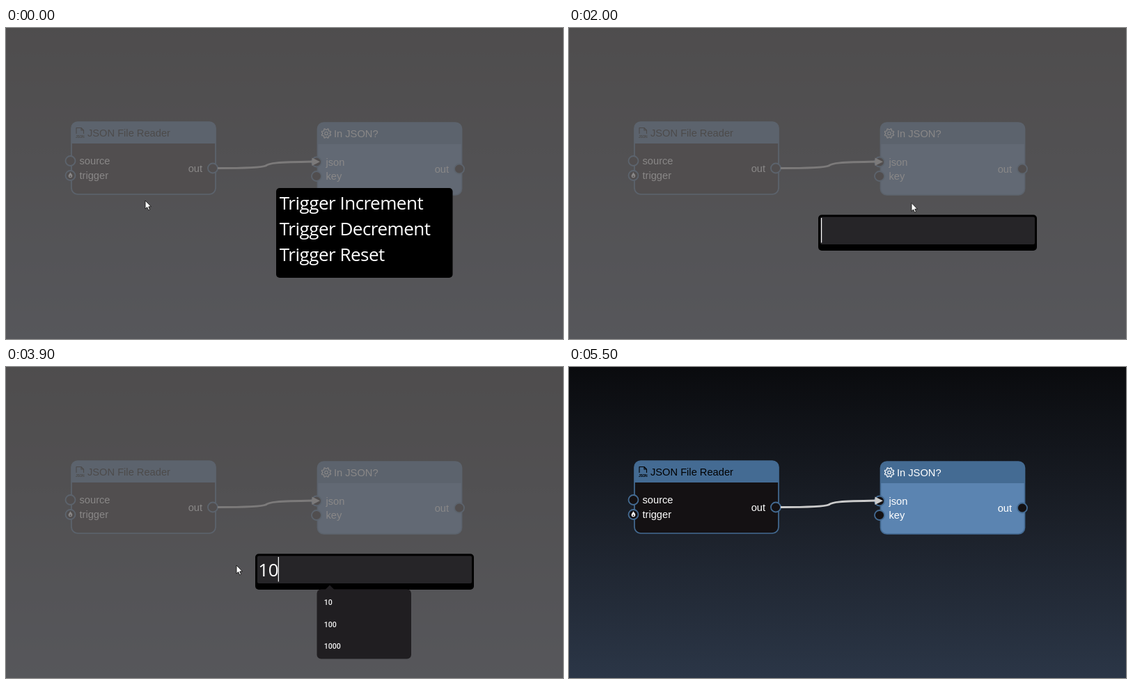
An HTML page with a canvas that plays this animation: 800 by 447 pixels, repeating every 5600 ms.

```html
<!DOCTYPE html>
<html lang="en">
<head>
<meta charset="utf-8">
<title>Node editor</title>
<style>
  html, body { margin: 0; width: 100%; height: 100%; overflow: hidden; background: #1c2029; }
  canvas { display: block; }
</style>
</head>
<body>
<canvas id="stage" width="800" height="447"></canvas>
<script>
const ctx = document.getElementById('stage').getContext('2d');
const W = 800, H = 447, LOOP = 5600, STEP = 100;
const BLUE = '#446b93', DARK = '#141113';
const NODE_FONT = '14.67px "Liberation Sans", Arial, sans-serif';
const MENU_FONT = '26px "Open Sans", "Noto Sans", sans-serif';
const LIST_FONT = '500 10.6px Roboto, sans-serif';

// Pointer stops: time, x, y
const POINTER = [
  [0, 200, 248], [100, 200, 248], [700, 521.5, 252], [1100, 521.5, 252],
  [1600, 511.5, 241], [1800, 511.5, 241], [2400, 436, 281], [3300, 436, 281],
  [3800, 331, 285], [4200, 331, 285], [4800, 715, -25]
];

const TYPED = [[1800, ''], [2400, '0'], [3100, ''], [3300, '1'], [3500, '10']];

const MENUS = [
  { from: 0, to: 1100, x: 388, y: 230, w: 253.5, h: 129, rowW: 222,
    rows: ['Trigger Increment', 'Trigger Decrement', 'Trigger Reset'] },
  { from: 1100, to: 1800, x: 418.5, y: 181, w: 192.5, h: 227, rowW: 161,
    rows: ['When Always', 'When <', 'When ≤', 'When =', 'When ≥', 'When >'] }
];

const LISTS = [
  { from: 2500, to: 3100, items: ['0.1', '0.5', '0.7', '0.9'] },
  { from: 3300, to: 4100, items: ['10', '100', '1000'] }
];
const CLOSE = 4000;

function text(str, x, y, font, color, spacing = 0) {
  ctx.font = font;
  ctx.letterSpacing = spacing + 'px';
  ctx.fillStyle = color;
  ctx.fillText(str, x, y);
}

function box(x, y, w, h, r, fill) {
  ctx.beginPath();
  ctx.roundRect(x, y, w, h, r);
  ctx.fillStyle = fill;
  ctx.fill();
}

function shape(points, fill) {
  ctx.beginPath();
  points.forEach(([x, y]) => ctx.lineTo(x, y));
  ctx.closePath();
  ctx.fillStyle = fill;
  ctx.fill();
}

function stroke(color, width) {
  ctx.strokeStyle = color;
  ctx.lineWidth = width;
  ctx.stroke();
}

function port(x, y) {
  ctx.beginPath();
  ctx.arc(x, y, 7, 0, Math.PI * 2);
  ctx.fillStyle = DARK;
  ctx.fill();
  stroke(BLUE, 1.8);
}

function node(x, y, body) {
  box(x, y, 207, 104, 9, body);
  box(x, y, 207, 31, [9, 9, 0, 0], BLUE);
  ctx.beginPath();
  ctx.roundRect(x, y, 207, 104, 9);
  stroke(BLUE, 1.7);
}

function fileIcon(x, y) {
  ctx.beginPath();
  ctx.moveTo(x + 1, y + 9);
  ctx.lineTo(x + 1, y + 0.5);
  ctx.lineTo(x + 8, y + 0.5);
  ctx.lineTo(x + 11.5, y + 4);
  ctx.lineTo(x + 11.5, y + 9);
  ctx.moveTo(x + 8, y + 0.5);
  ctx.lineTo(x + 8, y + 4);
  ctx.lineTo(x + 11.5, y + 4);
  stroke('#000', 1.1);
  text('JSON', x, y + 15, 'bold 5px "Liberation Sans", sans-serif', '#000', -0.3);
}

function gear(cx, cy) {
  ctx.beginPath();
  for (let i = 0; i < 32; i++) {
    const a = (i + 0.5) * Math.PI / 16;
    const r = (i + 1) % 4 < 2 ? 5.2 : 6.9;
    ctx.lineTo(cx + r * Math.cos(a), cy + r * Math.sin(a));
  }
  ctx.closePath();
  stroke('#fff', 1.2);
  ctx.beginPath();
  ctx.arc(cx, cy, 2.3, 0, Math.PI * 2);
  stroke('#fff', 1.1);
}

function flame(x, y) {
  ctx.beginPath();
  ctx.moveTo(x - 0.3, y - 4.2);
  ctx.bezierCurveTo(x + 1, y - 2, x + 3, y - 1, x + 2.8, y + 1.2);
  ctx.bezierCurveTo(x + 2.6, y + 4.6, x - 2.8, y + 4.6, x - 2.9, y + 1.2);
  ctx.bezierCurveTo(x - 2.8, y - 1, x - 0.6, y - 1.8, x - 0.3, y - 4.2);
  ctx.fillStyle = '#fff';
  ctx.fill();
  ctx.beginPath();
  ctx.arc(x, y + 1.7, 1, 0, Math.PI * 2);
  ctx.fillStyle = DARK;
  ctx.fill();
}

function wire() {
  ctx.beginPath();
  ctx.moveTo(304, 201.5);
  ctx.bezierCurveTo(345, 201.5, 367, 201, 373, 198);
  ctx.bezierCurveTo(378, 194, 387, 193, 442, 192);
  stroke('#cbcbcb', 3);
  shape([[439.5, 186.5], [451, 192.2], [439.5, 198]], '#cbcbcb');
}

function scene() {
  const sky = ctx.createLinearGradient(0, 0, 0, H);
  sky.addColorStop(0, '#0a0b0e');
  sky.addColorStop(0.5, '#1b2029');
  sky.addColorStop(1, '#2b3647');
  ctx.fillStyle = sky;
  ctx.fillRect(0, 0, W, H);

  node(94, 135, DARK);
  fileIcon(100, 143);
  text('JSON File Reader', 117, 156, NODE_FONT, '#000');
  text('source', 105.5, 196, NODE_FONT, '#fff');
  text('trigger', 105.5, 217, NODE_FONT, '#fff');
  text('out', 261.7, 207, NODE_FONT, '#fff');
  port(92.5, 191);
  port(92.5, 212);
  flame(92.5, 211.5);
  port(297, 201.5);

  node(447.5, 136, '#5b84b1');
  gear(460, 151.5);
  text('In JSON?', 471, 157, NODE_FONT, '#fff');
  text('json', 459.5, 197.5, NODE_FONT, '#fff');
  text('key', 459.5, 218, NODE_FONT, '#fff');
  text('out', 615.7, 207.5, NODE_FONT, '#fff');
  port(446, 192.5);
  port(446, 213);
  port(651, 202.5);
  wire();
}

function pointerAt(t) {
  const i = POINTER.findIndex(p => p[0] > t);
  if (i < 0) return null;
  const [t0, x0, y0] = POINTER[i - 1], [t1, x1, y1] = POINTER[i];
  const u = (t - t0) / (t1 - t0), k = u * u * (3 - 2 * u);
  return { x: x0 + (x1 - x0) * k, y: y0 + (y1 - y0) * k };
}

function menu(m, p) {
  box(m.x, m.y, m.w, m.h, 5, '#000');
  m.rows.forEach((label, i) => {
    const y = m.y + 2 + i * 36.9;
    const over = p.x > m.x + 3 && p.x < m.x + m.w && p.y >= y && p.y < y + 36.9;
    if (over) {
      ctx.fillStyle = '#3762c8';
      ctx.fillRect(m.x + 2.5, y, m.rowW, 37);
    }
    text(label, m.x + 4.7, y + 29, MENU_FONT, '#fff', -0.5);
  });
}

function input(t) {
  box(358, 268.5, 314, 51.5, 5, '#000');
  box(361, 271.5, 308, 39.5, 2, '#262528');
  const [since, value] = TYPED.filter(k => k[0] <= t).pop();
  text(value, 362.3, 301, MENU_FONT, '#fff', -0.5);
  if ((t - since) % 1000 < 500) {
    ctx.fillStyle = '#fff';
    ctx.fillRect(362 + ctx.measureText(value).width, 273, 1.2, 35.5);
  }
}

function list(l, t) {
  const h = 7 + l.items.length * 31;
  ctx.save();
  if (t >= CLOSE) {
    ctx.globalAlpha = 0.52;
    ctx.translate(514, 370);
    ctx.scale(0.98, 0.98);
    ctx.translate(-514, -370);
  }
  shape([[458.5, 320], [465, 313.5], [471.5, 320]], '#201e21');
  box(446.5, 319.5, 135.5, h, 6, '#201e21');
  l.items.forEach((s, i) => text(s, 456.8, 342.4 + i * 31.2, LIST_FONT, '#f4f4f4'));
  ctx.restore();
}

function arrow({ x, y }) {
  shape([[0, 0], [0, 12], [2.7, 9.6], [4.6, 13.8], [6.6, 12.9], [4.8, 8.9], [8.4, 8.7]]
    .map(([dx, dy]) => [x + dx, y + dy]), '#fff');
  ctx.lineJoin = 'round';
  stroke('#111', 0.9);
}

function beam({ x, y }) {
  ctx.beginPath();
  for (const s of [-1, 1]) {
    ctx.moveTo(x - 2.5, y + 5.5 * s);
    ctx.lineTo(x + 2.5, y + 5.5 * s);
  }
  ctx.moveTo(x, y - 5.5);
  ctx.lineTo(x, y + 5.5);
  stroke('#d8d8d8', 1);
}

function draw(t) {
  const active = o => t >= o.from && t < o.to;
  const p = pointerAt(t);
  const typing = t >= 1800 && t < CLOSE;
  scene();
  if (t < CLOSE) {
    ctx.fillStyle = 'rgba(100, 98, 98, 0.76)';
    ctx.fillRect(0, 0, W, H);
  }
  MENUS.filter(active).forEach(m => menu(m, p));
  if (typing) input(t);
  LISTS.filter(active).forEach(l => list(l, t));
  if (!p) return;
  const inField = typing && p.x > 361 && p.x < 669 && p.y > 271 && p.y < 311;
  (inField ? beam : arrow)(p);
}

const start = performance.now();
function tick() {
  const t = (performance.now() - start) % LOOP;
  draw(Math.floor(t / STEP) * STEP);
  requestAnimationFrame(tick);
}
tick();
</script>
</body>
</html>
```
